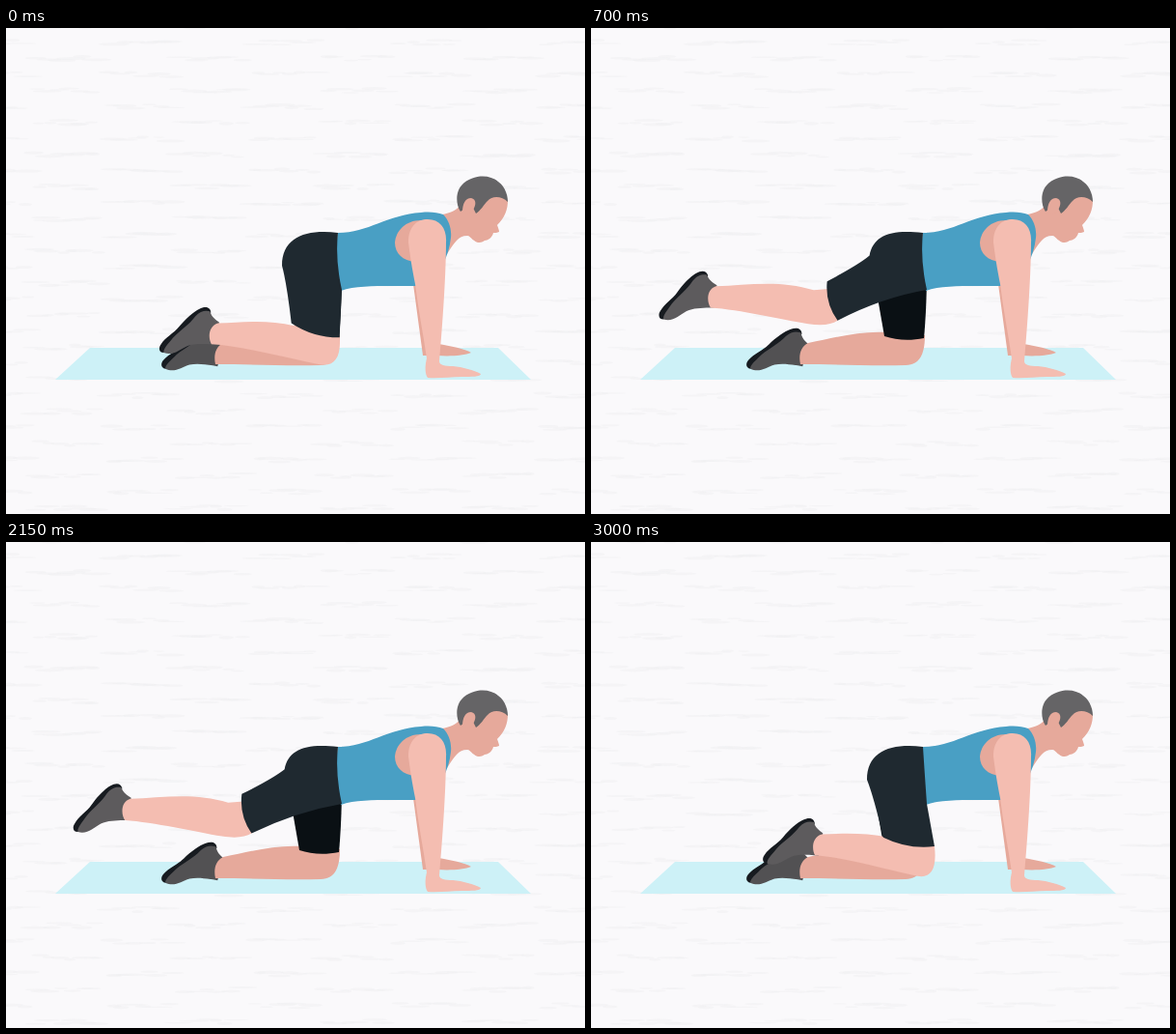
An HTML page for the animation above (3.9 s loop, 600x503 px).

```html
<!DOCTYPE html>
<html lang="en">
<head>
<meta charset="utf-8">
<title>Kneeling leg raise</title>
<style>
  html, body { margin: 0; width: 100%; height: 100%; overflow: hidden; background: #faf9fb; }
  svg { display: block; width: 600px; height: 503px; }
  .skin { fill: #f4bdb1; }
  .shade { fill: #e6a99b; }
  .hair { fill: #656466; }
  .top { fill: #499fc4; }
  .shorts { fill: #1f2930; }
  .farShorts { fill: #0a1014; }
  .sole { fill: #171b20; }
  .shoe { fill: #5d5b5d; }
  .farShoe { fill: #525153; }
</style>
</head>
<body>
<svg viewBox="0 0 600 503">
  <defs>
    <path id="sole" d="M5 5C0 5-1 0 2-4C6-11 14-15 20-23C26-31 34-39 40-42C45-45 51-45 52-39L46-28L18-4Z"/>
    <path id="shoe" d="M5 5C4 1 9-4 14-11C22-20 30-25 36-34C41-40 46-41 51-40C53-34 57-32 61-29L58-6L53-6C44-6 36-6 29-3C21 1 15 8 5 5Z"/>
  </defs>

  <g id="streaks" fill="#f0eff1"></g>
  <path fill="#cdf1f7" d="M87 331H510L544 364H51Z"/>

  <!-- far limbs -->
  <g transform="translate(161 347) rotate(9)">
    <use href="#sole" class="sole"/>
    <use href="#shoe" class="farShoe"/>
  </g>
  <path class="shade" d="M225 326C255 320 280 313 308 315L346 318C346 335 342 349 326 349C290 350 250 348 217 348C215 339 217 330 225 326Z"/>
  <path class="farShorts" d="M294 262L348 250C348 275 347 300 345 321C330 324 316 323 304 319Z"/>
  <path class="shade" d="M422 265L432 339H447C460 340 475 339 482 336C476 332 460 329 448 327L440 265Z"/>

  <!-- near lower leg -->
  <g id="foot">
    <use href="#sole" class="sole"/>
    <use href="#shoe" class="shoe"/>
  </g>
  <path id="leg" class="skin"/>

  <!-- head and torso -->
  <path class="shade" d="M447 194C458 192 466 190 470 184L486 176L500 170L520 178C520 188 517 196 509 204C510 207 511 209 511 211C509 212 507 212 505 212C504 217 499 220 496 220C493 222 491 222 489 222C485 221 482 217 479 215C470 214 465 221 457 234Z"/>
  <path class="hair" d="M471 190C465 181 467 168 472 163C478 156 487 153.500 494 153.500C509 153.500 520 165 520 180C514 174 504 173 499 179C495 183 492 189 487 192L482 182Z"/>
  <path class="shade" d="M473 190C473 182 476 176 482 176C488 177 487 184 484 188C482 192 477 194 473 191Z"/>
  <path class="top" d="M344 212C375 212 396 193 430 191C440 190 447 191 453 193C459 199 462 208 461 217C460 227 457 236 453 244L430 267H400C380 267 361 267 347 272L340 240Z"/>
  <path class="shade" d="M424 242C411 241 403 233 403 222C404 210 414 199 430 199L440 242Z"/>
  <path id="thigh" class="shorts"/>

  <!-- near arm -->
  <path class="skin" d="M417 222C417 205 426 198 437 198C450 198 457 208 456 222C456 250 453 300 449 345C449 349 455 350 463 350C473 351 485 354 492 358C492 361 482 361 472 361C460 361 448 363 437 362C434 358 434 350 436 342C432 315 427 290 424 265C421 250 419 238 417 222Z"/>
</svg>
<script>
  const LOOP = 3900, STEP = 50;
  const HIP = [314, 238], WAIST = [344, 212], GROIN = [348, 271];
  const byId = id => document.getElementById(id);
  const rad = deg => deg * Math.PI / 180;
  const clamp = v => Math.min(1, Math.max(0, v));

  const mix = (p, q, k) => [p[0] + (q[0] - p[0]) * k, p[1] + (q[1] - p[1]) * k];
  const add = (p, x, y) => [p[0] + x, p[1] + y];
  const polar = (p, r, deg) => add(p, r * Math.cos(rad(deg)), r * Math.sin(rad(deg)));
  const pt = p => p.map(v => v.toFixed(2)).join(' ');
  const path = (...parts) =>
    parts.map(p => typeof p === 'string' ? p : pt(p)).join(' ') + 'Z';

  // 0 = kneeling, 1 = leg fully raised
  const raiseAt = t => t < 1900
    ? clamp((t + 80) / 1080)
    : (1 - clamp((t - 1900) / 1100)) ** 1.2;

  // The thigh swings about the hip; hem, knee and foot follow it
  function poseAt(u) {
    const arch = Math.sin(Math.PI * u);
    const hem = polar(HIP, 74 + 5 * arch, 78 + 93 * u);
    const half = 20.5 + 6.5 * (1 - u) ** 2, tilt = 10 + 90 * u;
    const hemTop = polar(hem, -half, tilt), hemEnd = polar(hem, half, tilt);
    const butt = [286 + 5 * u * u, 246 - 20 * u * u];
    return {
      arch, hem, tilt, hemTop, hemEnd, butt,
      toe: add(hem, 28.5 * (1 - u) ** 6 - 180,
               17 - 5 * u + 3 * arch + 1.5 * Math.sin(2 * Math.PI * u)),
      turn: 3 - 6 * u,
      pit: add(hemTop, 5 - 26 * u, 12 * arch),
      knee: add(hemEnd, 4 - 19 * u, 35 - 39 * u),
      side: add(mix(butt, hemTop, .3), 2, 2 * arch),
      under: add(mix(hemEnd, GROIN, .5), 0, 14 * u * u - 20 * arch)
    };
  }

  function draw(t) {
    const u = raiseAt(t);
    const { arch, hem, tilt, hemTop, hemEnd, butt, toe, turn, pit, knee, side, under } = poseAt(u);
    const onFoot = (x, y) => polar(polar(toe, x, turn), y, turn + 90);

    byId('foot').setAttribute('transform', `translate(${pt(toe)}) rotate(${turn})`);

    const ankle = onFoot(60, -28), heel = onFoot(54, -6);
    const s = (pit[0] - ankle[0]) / 105;
    const shin = mix(knee, heel, .17);
    byId('leg').setAttribute('d', path(
      'M', ankle, 'C', add(ankle, 33 * s, -1), add(pit, -37 * s, -12 * s * s), pit,
      'L', mix(hemTop, hemEnd, .25 * arch), mix(hem, HIP, .3), hemEnd,
      'C', mix(hemEnd, knee, .65), mix(shin, knee, .65), shin,
      'C', mix(knee, heel, .4), add(heel, .3 * (shin[0] - heel[0]), 2), heel,
      'C', onFoot(50, -12), onFoot(50, -25), ankle));

    const lift = 246 - butt[1];
    const pull = Math.max(0, hemEnd[0] - GROIN[0]) * .6;
    byId('thigh').setAttribute('d', path(
      'M', WAIST, 'C', [310, 208], [286 + lift * .6, 217 - lift * .2], butt,
      'Q', side, hemTop, 'Q', polar(hem, 8, tilt + 90), hemEnd,
      'Q', under, GROIN, 'Q', [341 + pull, 240], WAIST));
  }

  // Faint brushed texture: broken dashes in offset rows
  let seed = 7;
  const rand = () => (seed = seed * 16807 % 2147483647) / 2147483647;
  let dashes = '';
  for (let row = 0; row < 31; row++) {
    const y = 15 + 16.6 * (row - 1);
    for (let x = (row % 2 ? 105 : 28) - 150; x < 600; x += 150) {
      for (let n = 0; n < 6; n++) {
        const cx = x + n * 12 + rand() * 8, cy = y + rand() * 5 - 2.5;
        dashes += `<ellipse cx="${cx}" cy="${cy}" rx="${6 + rand() * 10}" ry="${.6 + rand()}" opacity=".5"/>`;
      }
    }
  }
  byId('streaks').innerHTML = dashes;

  const start = performance.now();
  function tick() {
    const t = (performance.now() - start) % LOOP;
    draw(Math.floor(t / STEP) * STEP);
    requestAnimationFrame(tick);
  }
  tick();
</script>
</body>
</html>
```
